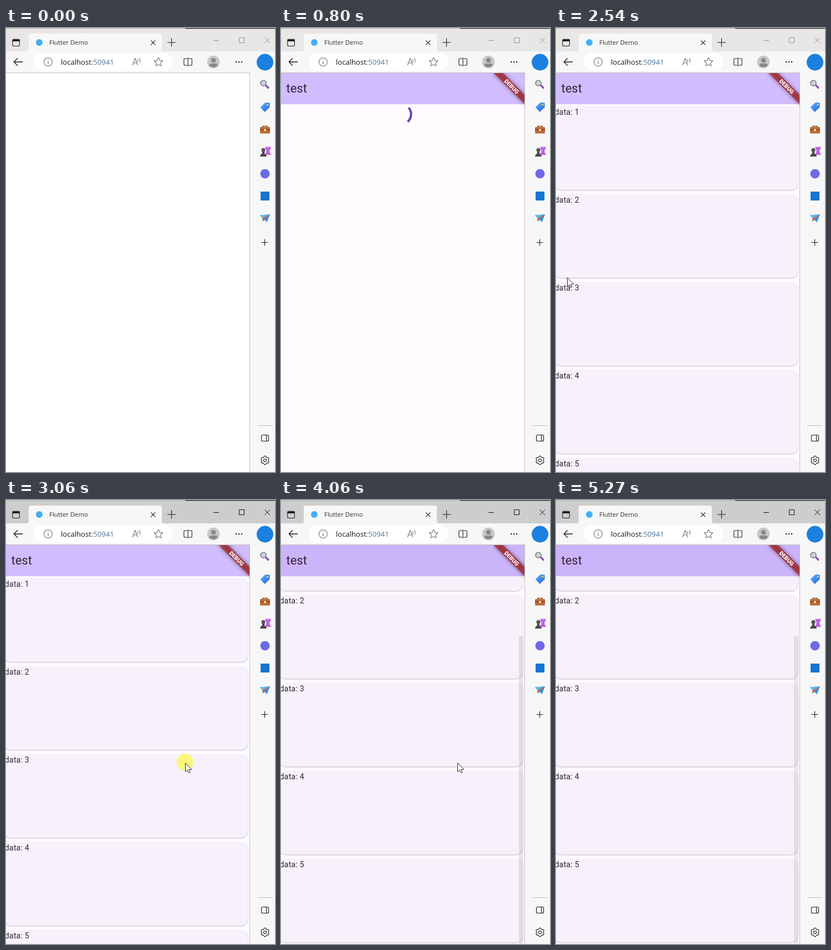
An HTML page for the animation above (5.37 s loop, 485 px wide and 798 px high).

```html
<!DOCTYPE html>
<html lang="en">
<head>
<meta charset="utf-8">
<title>Flutter Demo</title>
<style>
  html, body { margin: 0; width: 100%; height: 100%; overflow: hidden; background: #f7f7f7; }
  svg { display: block; width: 100vw; height: 100vh; }
  .ui { font-family: "Open Sans", "Noto Sans", sans-serif; }
  .app { font-family: Roboto, sans-serif; }
  .line { fill: none; stroke: #1b1b1b; stroke-width: 1.1; }
  .soft { stroke: #707070; }
  .card rect { fill: #f6f1fb; filter: drop-shadow(0 1px 1px rgba(0, 0, 0, .26)); }
  .card text { font-size: 14px; letter-spacing: .25px; fill: #2b282e; }
</style>
</head>
<body>
<svg viewBox="0 0 485 798">
  <defs>
    <clipPath id="viewport"><path d="M0 81H439V798H0Z"/></clipPath>
    <filter id="blur" x="-50%" y="-150%" width="200%" height="400%"><feGaussianBlur stdDeviation="3.5"/></filter>
    <linearGradient id="tagFill" x2="1" y2="1"><stop stop-color="#56b2ff"/><stop offset="1" stop-color="#2c63d6"/></linearGradient>
  </defs>

  <!-- Window frame -->
  <path id="titleBar" d="M0 0H485V42H0Z"/>
  <path d="M0 0H323V1.3H0Z" fill="#b9b9b9"/>
  <path d="M323 0H485V1.2H323Z" fill="#1c1c1c"/>
  <path d="M0 42H485V798H0Z" fill="#f7f7f7"/>
  <path d="M37 42Q41 42 41 38V14Q41 10 45 10H277Q281 10 281 14V38Q281 42 285 42Z" fill="#f7f7f7"/>
  <g class="line">
    <rect x="11.8" y="20.3" width="12.6" height="12.2" rx="2.2"/>
    <path d="M12 22.3H24.5" stroke-width="3.4"/>
    <path d="M261.3 22.3l8 8m0-8l-8 8M291 26H306M298.5 18.5V33.5"/>
    <path d="M30 61H14.5M21 54.3L14.3 61L21 67.7" stroke-width="1.3"/>
  </g>
  <circle cx="60" cy="26" r="6" fill="#3fb0f3"/>
  <text class="ui" x="78" y="30.2" font-size="11.4" fill="#333">Flutter Demo</text>
  <path id="windowButtons" d="M374 22.5H384M420.5 17.5H429.5V26.5H420.5ZM466.5 17.5l9.5 9.5m0-9.5l-9.5 9.5" fill="none"/>

  <!-- Toolbar -->
  <rect x="50" y="45" width="251" height="32" rx="16" fill="#fff"/>
  <g class="line soft">
    <circle cx="76" cy="61" r="7.5"/>
    <path d="M76 60V65M76 56.6V58" stroke-width="1.3"/>
    <path d="M228 67L232.8 54.5L237.6 67M229.6 62.8H236M236.8 56.4Q238.6 58.6 237.4 61M239.8 54Q243.4 58 241 62.4"/>
    <path id="star" stroke-linejoin="round"/>
  </g>
  <text class="ui" x="99" y="65.8" font-size="13.1" fill="#151515">localhost<tspan fill="#4f7597">:50941</tspan></text>
  <g class="line">
    <path d="M326.5 55H322.5Q320.8 55 320.8 56.7V65.3Q320.8 67 322.5 67H326.5M329.5 55H333.5Q335.2 55 335.2 56.7V65.3Q335.2 67 333.5 67H329.5M328 53V69"/>
  </g>
  <circle cx="374" cy="61" r="11.4" fill="#cac8c6"/>
  <path d="M366.5 68Q366.5 63.8 370 63.8H378Q381.5 63.8 381.5 68Q374 73.5 366.5 68Z" fill="#8b8988"/>
  <circle cx="374" cy="58" r="4.3" fill="#8b8988"/>
  <path d="M415 61h0M420 61h0M425 61h0" stroke="#1b1b1b" stroke-width="2.4" stroke-linecap="round"/>

  <!-- Sidebar -->
  <circle cx="467" cy="61.5" r="15" fill="#1b80df"/>
  <path d="M468.5 103L473 107.5" stroke="#8951b8" stroke-width="3.2" stroke-linecap="round"/>
  <circle cx="464" cy="99" r="5" fill="#c9d3dc" stroke="#77777f" stroke-width="1.5"/>
  <path d="M459 142.5L467.5 134.5L475 134.8V142.5L466.5 150.5Z" fill="url(#tagFill)" stroke="url(#tagFill)" stroke-linejoin="round"/>
  <circle cx="471.8" cy="138" r="1.6" fill="#ffd45e"/>
  <path d="M463 179V176.5H471V179" fill="none" stroke="#8d4b23" stroke-width="1.6"/>
  <rect x="458" y="178" width="18" height="11.5" rx="1.5" fill="#c1672c"/>
  <path d="M458 183H476" stroke="#8d4420" stroke-width="1.6"/>
  <rect x="465" y="181.5" width="4" height="4" rx="1" fill="#d8d8d8"/>
  <path d="M468 213H470V215H471.5V213H473.5V215H475V213H477V218L475 219.5L476 226H478V228H468V226L470 219.5L468 218Z" fill="#c060e8"/>
  <path d="M458 231Q458 227.5 461.5 226L462.2 222H465.8L466.5 226Q470 227.5 470 231Z" fill="#48484c"/>
  <circle cx="464" cy="219.3" r="3.6" fill="#55555a"/>
  <circle cx="467" cy="262" r="8.5" fill="#6d6be6"/>
  <rect x="459" y="294" width="16" height="16" fill="#1674cf"/>
  <path d="M458 336.5L476 335L470.5 349L466.5 345L462.5 347.5V342Z" fill="#2f93e6"/>
  <path d="M458 336.5L476 335L462.5 342Z" fill="#55b9f7"/>
  <path d="M476 335L462.5 342V347.5Z" fill="#cf6a35"/>
  <path d="M453 714.5H481" stroke="#bdbdbd"/>
  <g class="line">
    <path d="M460.5 385.5H472.5M466.5 379.5V391.5"/>
    <rect x="460.5" y="731.5" width="13" height="11" rx="2"/>
    <path d="M469.5 731.5V742.5"/>
    <path id="gear" stroke-linejoin="round"/>
    <circle cx="467" cy="777" r="2.5"/>
  </g>

  <!-- Page -->
  <g class="app" clip-path="url(#viewport)">
    <path id="page" d="M0 81H439V798H0Z"/>
    <g id="app">
      <circle id="spinner" cx="216.5" cy="155" r="18" fill="none" stroke="#6b43b8" stroke-width="4" stroke-linecap="square" pathLength="360"/>
      <g id="cards"></g>
      <rect id="thumb" x="429" width="8" height="554" rx="4" fill="#1c1b1f"/>
      <path id="appBar" d="M0 81H439V137H0Z"/>
      <text x="9.5" y="116" font-size="22" fill="#35233c">test</text>
      <g transform="translate(440 81) rotate(45)">
        <rect x="-40" y="28" width="80" height="12" opacity=".5" filter="url(#blur)"/>
        <rect x="-60" y="28" width="120" height="12" fill="#b71c1c" opacity=".63"/>
        <text y="37.7" font-size="10.2" font-weight="900" text-anchor="middle" fill="#fff">DEBUG</text>
      </g>
    </g>
  </g>
  <path d="M0 80.5H439.5V798" fill="none" stroke="#c0c0c0"/>

  <circle id="click" cx="323" cy="471" r="15" fill="#faf67c"/>
  <path id="cursor" d="M.5 .7V16.6L4.2 13.1L6.6 18.4L9 17.3L6.7 12.3H11.8Z" fill="#fff" stroke="#111" stroke-width=".9"/>
</svg>

<script>
const LOOP = 5370, LOADED = 300, DATA = 1940, FOCUS = 2940, RELEASE = 3160, SCROLL = 3360;
const MAX_SCROLL = 128;

// Rows are [time, ...values]; the latest row reached applies.
const TICK_LAG = [[0, 0], [1220, 20], [1540, 40], [3060, 60], [4770, 70]];
const SCROLLS = [[0, 0], [SCROLL, 100], [3460, MAX_SCROLL]];
const POINTER = [
  [0, -50, -50], [2540, 20, 448], [2640, 344, 448], [2840, 323, 472], [3660, 318, 472],
  [4160, 278, 376], [4260, 214, 226], [4360, 176, 140], [4770, 177, 169],
  [4970, 268, 250], [5070, 395, 350], [5170, 463, 410], [5270, -50, -50]
];

const $ = id => document.getElementById(id);
const set = (id, attrs) => { for (const key in attrs) $(id).setAttribute(key, attrs[key]); };
const show = (id, on) => set(id, { visibility: on ? "visible" : "hidden" });
const clamp = x => Math.min(1, Math.max(0, x));
const latest = (rows, t) => rows.filter(row => row[0] <= t).pop().slice(1);

function polar(cx, cy, count, radius) {
  const points = Array.from({ length: count }, (_, i) => {
    const a = i / count * 2 * Math.PI, r = radius(i, a);
    return (cx + r * Math.sin(a)).toFixed(2) + " " + (cy - r * Math.cos(a)).toFixed(2);
  });
  return "M" + points.join("L") + "Z";
}

// cubic-bezier(.4, 0, .2, 1)
function fastOutSlowIn(x) {
  let lo = 0, hi = 1;
  for (let i = 0; i < 20; i++) {
    const s = (lo + hi) / 2, r = 1 - s;
    if (1.2 * r * r * s + .6 * r * s * s + s ** 3 < x) lo = s; else hi = s;
  }
  return lo * lo * (3 - 2 * lo);
}

function drawSpinner(time) {
  const p = time / 1333 % 1;
  const head = 270 * fastOutSlowIn(clamp(p * 2));
  const tail = 270 * fastOutSlowIn(clamp(p * 2 - 1));
  const start = tail + p * 90 + time / 2222 * 360 - 90;
  set("spinner", {
    "stroke-dasharray": `${Math.max(head - tail, .1)} 720`,
    transform: `rotate(${start} 216.5 155)`
  });
}

function draw(now) {
  const t = now % LOOP;
  const [lag] = latest(TICK_LAG, t);
  const tick = Math.floor((t - lag) / 100) * 100 + lag;
  const active = t >= FOCUS;
  const [scroll] = latest(SCROLLS, t);
  const [x, y] = latest(POINTER, t);

  set("titleBar", { fill: active ? "#cdcdcd" : "#e8e7e6" });
  set("windowButtons", { stroke: active ? "#111" : "#929292" });
  set("page", { fill: t < LOADED ? "#fff" : "#fffbff" });
  set("app", { display: t < LOADED ? "none" : "inline" });
  set("appBar", { fill: scroll ? "#ccb4fa" : "#d1bcfe" });

  show("spinner", t < DATA);
  drawSpinner(tick + 170);
  show("cards", t >= DATA);
  set("cards", { transform: `translate(0 ${-scroll})` });

  const fadeIn = clamp((tick - SCROLL) / 100), fadeOut = clamp((tick - 4060) / 300);
  const hover = clamp((tick - 4970) / 350);
  set("thumb", { y: 137 + 107 * scroll / MAX_SCROLL, opacity: .1 * (fadeIn * (1 - fadeOut) + hover) });

  show("click", active && t < RELEASE);
  set("cursor", { transform: `translate(${x} ${y})` });
  requestAnimationFrame(draw);
}

set("star", { d: polar(275, 61.5, 10, i => i % 2 ? 3.9 : 8.2) });
set("gear", { d: polar(467, 777, 48, (i, a) => 6.9 + Math.cos(6 * a)) });
$("cards").innerHTML = [1, 2, 3, 4, 5].map(n =>
  `<g class="card" transform="translate(-3 ${158 * n - 17})">
    <rect width="439" height="150" rx="12"/><text x=".7" y="15">data: ${n}</text></g>`).join("");
requestAnimationFrame(draw);
</script>
</body>
</html>
```
